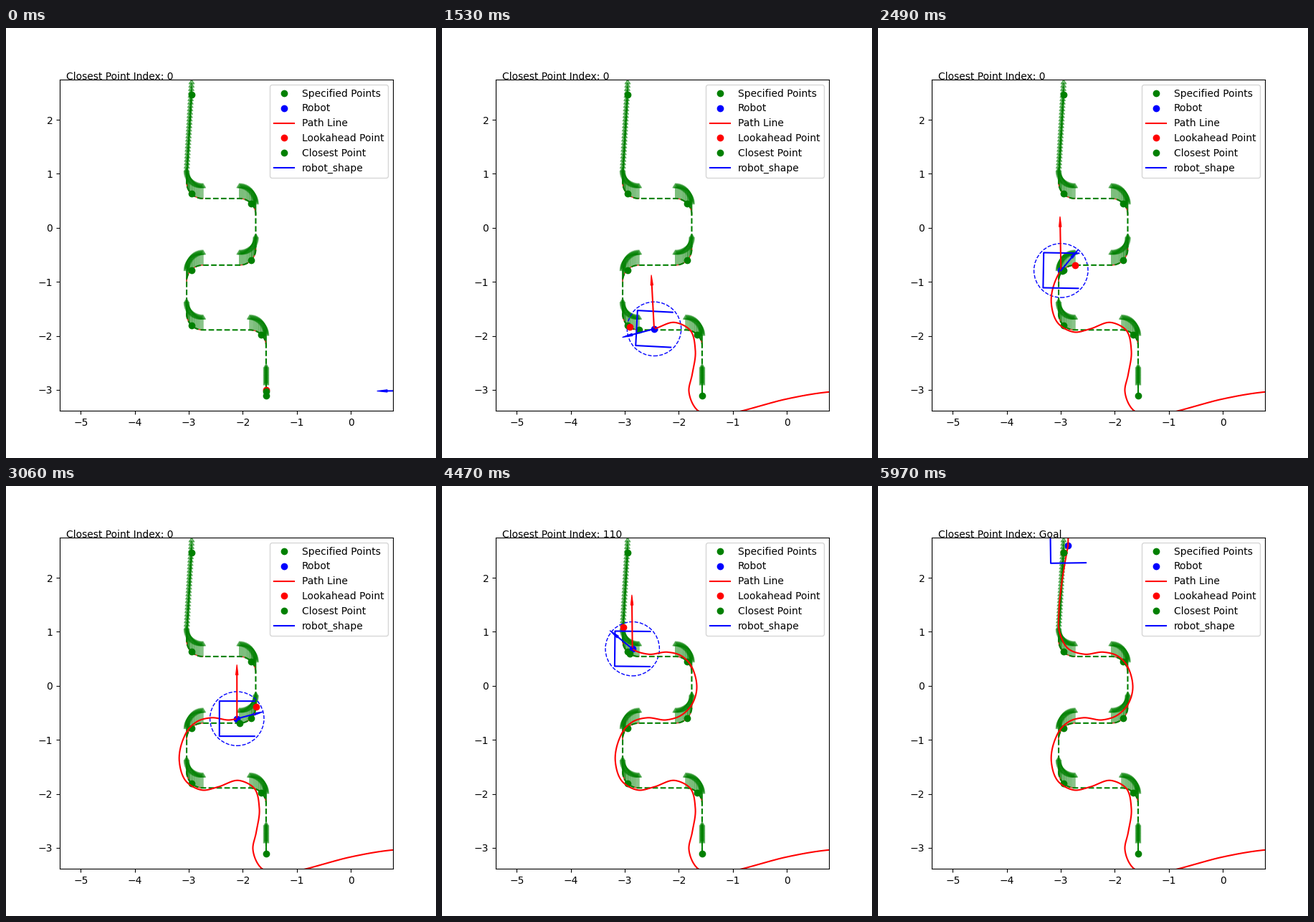
A matplotlib script for the animation above (6 s loop, 600 px wide and 600 px high).

```python
import numpy as np
import matplotlib.pyplot as plt
from matplotlib.animation import FuncAnimation
from matplotlib.collections import PatchCollection
from matplotlib.patches import Circle, FancyArrow, Polygon

FRAMES, INTERVAL = 200, 30
INDEX_AT, GOAL_AT = 137, 176
SCALE = 75.4                       # pixels per metre
ORIGIN = np.array([481.3, 278.9])  # pixel of (0, 0)
RADIUS = 0.3                       # corner radius
HALF = 0.325                       # half side of the robot

# Robot way points in pixels
ROUTE = np.array([
    (594, 506), (567, 506.3), (540, 508), (480, 518), (420, 534), (382, 542),
    (357, 534), (344.5, 507), (349, 484), (353.5, 450), (346, 421.5),
    (325, 411), (296, 420), (274, 424.5), (252, 413), (241.8, 384),
    (247, 354), (255.3, 338.5), (268, 328), (286, 323.5), (313, 326.5),
    (333, 320.5), (348, 306), (355.4, 284), (353.2, 264.7), (345, 247),
    (333, 236.5), (315, 231.9), (288, 234.8), (265.7, 227.3), (253.5, 205),
    (252.5, 175), (255.5, 142), (259.5, 115), (265.2, 83)])
# Time step at which a way point is reached
PASS = {0: 0, 2: 7, 4: 16, 6: 20.5, 7: 26, 8: 30, 10: 39.8, 12: 51,
        17: 83, 24: 122, 29: 149, 32: 168, 33: 176, 34: 188}
# Heading in degrees left of straight up
TURNS = {0: 2, 30: 2.6, 51: 3, 83: 1, 122: -0.9, 149: 0.6, 199: -0.8}

# Corner centres with start and end angle
CORNERS = [(-1.869, -2.191, 0, 90), (-2.741, -1.591, 270, 180),
           (-2.741, -0.991, 180, 90), (-2.061, -0.391, 270, 360),
           (-2.061, 0.242, 0, 90), (-2.741, 0.842, 270, 180)]
START, END = (-1.569, -3.107), (-2.948, 2.465)


def hermite(keys, points, t):
    """Smooth curve through the points given at the keys."""
    slopes = np.gradient(points, keys, axis=0)
    i = np.clip(np.searchsorted(keys, t, side="right") - 1, 0, len(keys) - 2)
    h = (keys[i + 1] - keys[i])[:, None]
    u = (t - keys[i])[:, None] / h
    p, q, a, b = points[i], points[i + 1], slopes[i] * h, slopes[i + 1] * h
    return p + u * (a + u * (3 * (q - p) - 2 * a - b + u * (2 * (p - q) + a + b)))


def drive(t):
    """Robot positions at the times t."""
    points = (ROUTE - ORIGIN) / (SCALE, -SCALE)
    steps = np.hypot(*np.diff(points, axis=0).T)
    chord = np.concatenate([[0], np.cumsum(steps)])
    times = np.array(list(PASS.values()), float)
    dist = hermite(times, chord[list(PASS)][:, None], np.minimum(t, times[-1]))
    return hermite(chord, points, np.clip(dist[:, 0], 0, chord[-1]))


def corner(cx, cy, a, b, n=19):
    t = np.radians(np.linspace(a, b, n))
    return np.column_stack([cx + RADIUS * np.cos(t), cy + RADIUS * np.sin(t)])


arcs = [corner(*c) for c in CORNERS]
lead_in = np.linspace(START, (START[0], -2.8), 12)
lead_out = np.linspace(arcs[-1][-1], END, 27)[1:]
track = np.vstack([lead_in, *arcs, lead_out])
marks = np.vstack([START, *[a[len(a) // 2] for a in arcs], END])

SUB = 4
fine = np.arange((FRAMES - 1) * SUB + 1) / SUB
trail = drive(fine)
speed = 10 * np.gradient(trail, fine, axis=0)   # metres per second

fig = plt.figure(figsize=(6, 6), dpi=100)
ax = fig.add_subplot()
ax.set_xlim(-5.3885, 0.7785)
ax.set_ylim(-3.3856, 2.7436)

ax.add_collection(PatchCollection(
    [FancyArrow(x, y, 0, 0.2, width=0.001, head_width=0.1, head_length=0.08)
     for x, y in track], facecolor="g", edgecolor="g", lw=1, alpha=0.5))
for arc in arcs:
    ax.plot(*arc.T, "r-", lw=1, alpha=0.7)
ax.plot(*track.T, "g--")
ax.plot(*marks.T, "go", label="Specified Points")
robot, = ax.plot([], [], "bo", label="Robot")
path, = ax.plot([], [], "r-", label="Path Line")
ahead, = ax.plot([], [], "ro", label="Lookahead Point")
closest, = ax.plot([], [], "go", label="Closest Point")
shape, = ax.plot([], [], "b-", label="robot_shape")
ring = ax.add_patch(Circle((0, 0), 0.5, fill=False, ec="b", ls="--"))
label = ax.text(0.02, 1, "", transform=ax.transAxes)
ax.legend(loc="upper right")


class Arrow:
    def __init__(self, color):
        self.shaft, = ax.plot([], [], color=color, lw=1.5)
        self.head = ax.add_patch(Polygon(np.zeros((3, 2)), color=color, lw=0.8))

    def set(self, pos, vec):
        size = np.hypot(*vec)
        unit = vec / max(size, 1e-6)
        tip, base = pos + vec, pos + unit * max(size - 0.19, 0)
        side = np.array([-unit[1], unit[0]]) * min(0.022, size / 8)
        self.shaft.set_data(*np.transpose([pos, base]))
        self.head.set_xy([tip, base + side, base - side])


heading, velocity = Arrow("r"), Arrow("b")
BOX = np.array([(1, 1), (-1, 1), (-1, -1), (1, -1)]) * HALF


def update(n):
    k = n * SUB
    pos = trail[k]
    goal = n >= GOAL_AT
    turn = np.radians(np.interp(n, list(TURNS), list(TURNS.values())))
    c, s = np.cos(turn), np.sin(turn)

    dist = np.hypot(*(track - pos).T)
    last = len(track) - 1
    near = last if goal else int(dist.argmin())
    inside = np.flatnonzero(dist < 0.46)
    look = min(max(near + 1, inside.max(initial=0)), last)

    robot.set_data(*pos[:, None])
    path.set_data(*trail[:k + 1].T)
    ahead.set_data(*track[look][:, None])
    closest.set_data(*track[near][:, None])
    shape.set_data(*(pos + BOX @ np.array([(c, -s), (s, c)])).T)
    ring.center = pos
    ring.set_visible(not goal)
    heading.set(pos, np.array([-s, c]))
    velocity.set(pos, speed[k])
    value = "Goal" if goal else 110 if n >= INDEX_AT else 0
    label.set_text(f"Closest Point Index: {value}")


anim = FuncAnimation(fig, update, frames=FRAMES, interval=INTERVAL,
                     init_func=lambda: update(0), repeat=True, repeat_delay=0)
plt.show()
```
